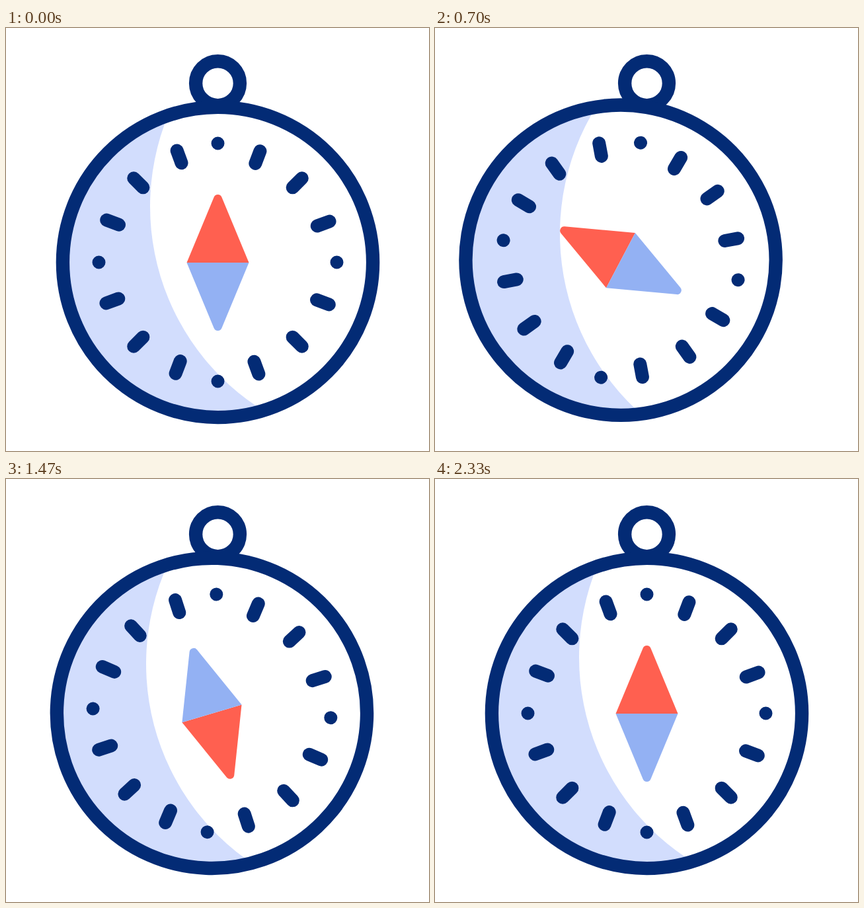
An HTML page that plays this animation: 640 by 640 pixels, repeating every 2.57 s.

```html
<!DOCTYPE html>
<html lang="en">
<head>
<meta charset="utf-8">
<title>Compass</title>
<style>
  html, body { margin: 0; width: 100%; height: 100%; overflow: hidden; background: #fff; }
  svg { display: block; width: 100%; height: 100%; }
</style>
</head>
<body>
<svg viewBox="0 0 640 640">
  <defs>
    <clipPath id="face"><circle cx="320.5" cy="354.5" r="234"/></clipPath>
  </defs>
  <g fill="none" stroke="#032b75" stroke-width="20.4" stroke-linecap="round">
    <circle cx="320.5" cy="83.7" r="33.4"/>
    <g id="body">
      <g clip-path="url(#face)" stroke="none">
        <circle cx="320.5" cy="354.5" r="234" fill="#d2ddfd"/>
        <circle cx="582" cy="270" r="364" fill="#fff"/>
      </g>
      <circle cx="320.5" cy="354.5" r="234.6"/>
      <path id="ticks" transform="translate(320.5 354.5)" stroke-width="20"/>
      <g id="needle" stroke="none">
        <path fill="#ff6050" d="M-47 0L-5.9-99A6.4 6.4 0 0 1 5.9-99L47 0Z"/>
        <path fill="#93b1f3" d="M-47 0L-5.9 99A6.4 6.4 0 0 0 5.9 99L47 0Z"/>
      </g>
    </g>
  </g>
</svg>
<script>
const FPS = 30, FRAMES = 77, LOOP = 2570;

// [frame, degrees]
const SWING = [[0, 0], [10, -10], [20, 10], [30, -5], [40, 5], [50, -3], [60, 3], [70, 0]];
const SPIN = [[0, 0], [20, -420], [30, -840], [40, -1260], [60, -1440]];

const $ = id => document.getElementById(id);
const body = $('body'), needle = $('needle');

function point(distance, degrees) {
  const a = degrees * Math.PI / 180;
  return `${(distance * Math.sin(a)).toFixed(2)} ${(-distance * Math.cos(a)).toFixed(2)}`;
}

// Each quarter holds one dot and three dashes.
let ticks = '';
for (let quarter = 0; quarter < 360; quarter += 90) {
  for (const offset of [0, 20.8, 45, 69.9]) {
    const angle = quarter + offset;
    ticks += `M${point(offset ? 160 : 180, angle)}L${point(180, angle)}`;
  }
}
$('ticks').setAttribute('d', ticks);

function valueAt(keys, frame) {
  const next = keys.findIndex(key => key[0] > frame);
  if (next < 0) return keys[keys.length - 1][1];
  const [f0, v0] = keys[next - 1], [f1, v1] = keys[next];
  const u = (frame - f0) / (f1 - f0);
  return v0 + (v1 - v0) * u * u * (3 - 2 * u);
}

function draw(now) {
  const frame = Math.min(FRAMES, Math.floor((now % LOOP + 3.4) * FPS / 1000));
  body.setAttribute('transform', `rotate(${valueAt(SWING, frame)} 320.5 117.5)`);
  needle.setAttribute('transform', `translate(320.5 355) rotate(${valueAt(SPIN, frame)})`);
  requestAnimationFrame(() => draw(performance.now()));
}
draw(performance.now());
</script>
</body>
</html>
```
